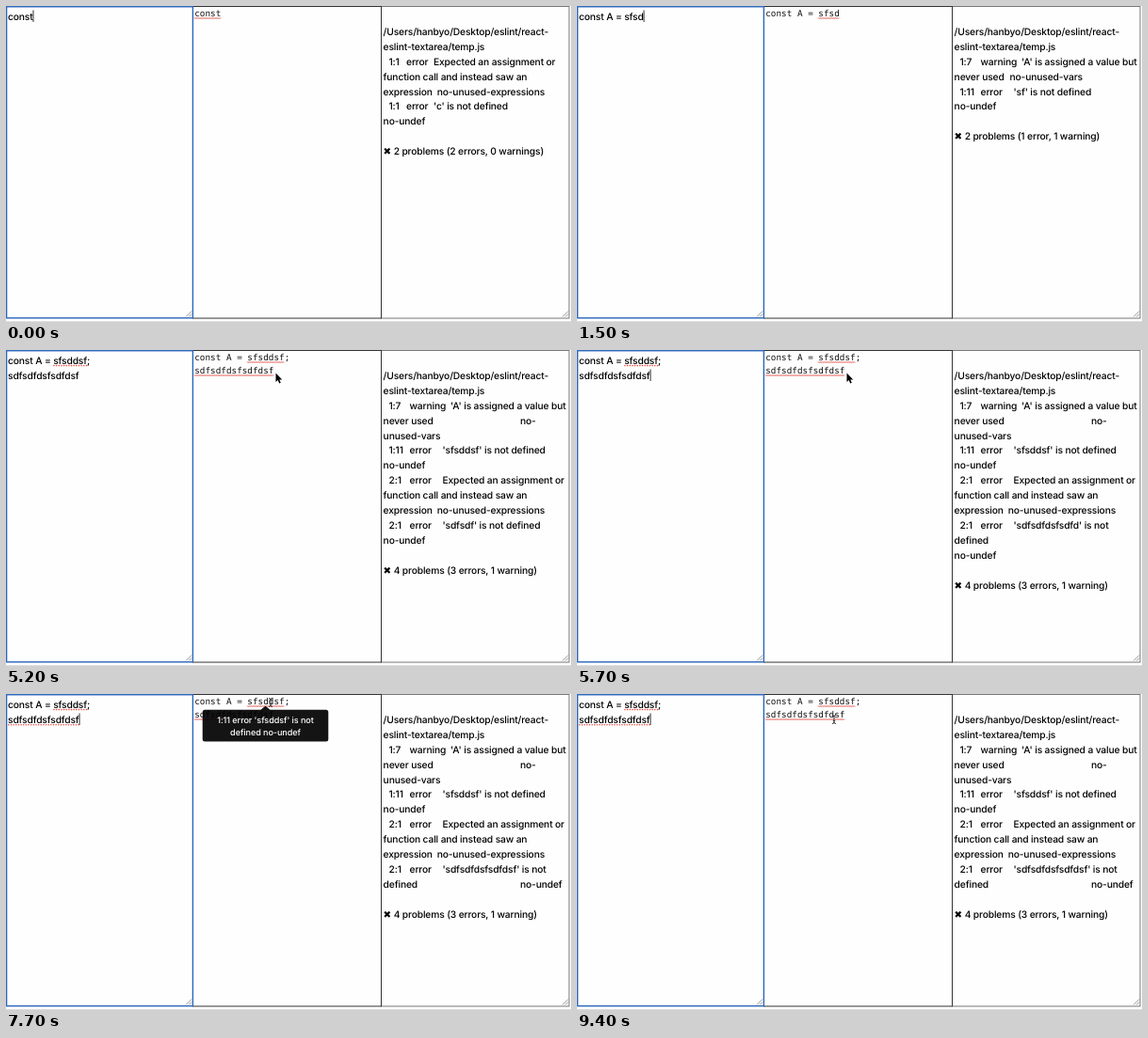
An HTML page with a canvas that plays this animation: 600x336 px, repeating every 9.6 s.

```html
<!DOCTYPE html>
<html lang="en">
<head>
<meta charset="utf-8">
<title>Lint textarea</title>
<style>
html, body { margin: 0; width: 100%; height: 100%; overflow: hidden; background: #fefefe; }
canvas { display: block; width: 600px; height: 336px; }
</style>
</head>
<body>
<canvas id="stage"></canvas>
<script>
const LOOP = 9600;
const SANS = '500 10.28px Inter, "Open Sans", sans-serif';
const TIP = '500 9.1px Inter, "Open Sans", sans-serif';
const MONO = '9.33px "DejaVu Sans Mono", monospace';
const TRACKING = -0.15;
const canvas = document.getElementById('stage');
const ctx = canvas.getContext('2d');
const ratio = window.devicePixelRatio || 1;
canvas.width = 600 * ratio;
canvas.height = 336 * ratio;

const LINE1 = 'const A = sfsddsf;';
const LINE2 = 'sdfsdfdsfsdfdsf';

// Each key: [time, characters on line 1, characters on line 2 or -1 before the break]
const keys = [
  [0, 5, -1], [100, 6, -1], [300, 7, -1], [400, 8, -1], [600, 9, -1], [700, 10, -1],
  [1200, 11, -1], [1300, 12, -1], [1400, 13, -1], [1500, 14, -1], [1600, 15, -1],
  [1700, 16, -1], [2200, 17, -1], [2700, 18, -1], [3000, 18, 0]
];
for (let i = 1; i <= 8; i++) keys.push([3500 + i * 100, 18, Math.round(i * 15 / 8)]);

const results = [
  [0, () => unused('c')],
  [200, () => parseError(['1:6', 'Parsing error: Unexpected'], ['token (1:5)'], 'const', 5)],
  [500, () => parseError(['1:8', "Parsing error: 'Const"],
    ["declarations' require an", 'initialization value (1:7)'], 'const A', 7)],
  [1000, () => parseError(['1:11', 'Parsing error: Unexpected'], ['token (1:10)'], 'const A =', 10)],
  [1400, () => undef('sf')],
  [1700, () => undef('sfsd')],
  [2200, () => undef('sfsdds')],
  [2500, () => undef('sfsddsf')],
  [4600, () => both('s')],
  [4800, () => both('sdf')],
  [5000, () => both('sdfsd')],
  [5200, () => both('sdfsdf')],
  [5400, () => both('sdfsdfdsf')],
  [5600, () => both('sdfsdfdsfsdfd')],
  [6300, () => both(LINE2)]
];

// Pointer path: [time, x, y, shape]
const pointer = [
  [4900, 300, 60, 'arrow'], [5000, 294, 42, 'arrow'], [5100, 288, 28, 'arrow'],
  [5200, 286.5, 24.5, 'arrow'], [5900, 286.5, 24.5, 'arrow'], [6000, 279, 38, 'arrow'],
  [6100, 270, 26, 'beam'], [6400, 270, 24, 'beam'], [6600, 280, 12, 'beam'],
  [6700, 280.5, 9, 'beam'], [7700, 281, 9, 'beam'], [8000, 312, 17, 'arrow'],
  [8500, 290, 12, 'beam'], [8700, 286, 50, 'arrow'], [8900, 282, 78, 'arrow'],
  [9200, 274, 36, 'arrow'], [9300, 273, 27, 'beam'], [9600, 273, 27, 'beam']
];

const last = (list, t) => list.reduce((hit, item) => item[0] <= t ? item : hit, list[0]);
const LEFT = 400.6;
const plain = text => [[LEFT, text]];
const head = () => [plain('/Users/hanbyo/Desktop/eslint/react-'), plain('eslint-textarea/temp.js')];
const row = (...parts) => parts;
const issue = (at, kind, msg, kx = 428.5, mx = 463.5) => row([406.5, at], [kx, kind], [mx, msg]);
const total = text => plain('✖ ' + text);

function unused(name) {
  return [...head(),
    issue('1:1', 'error', 'Expected an assignment or', 425, 454),
    plain('function call and instead saw an'),
    row([LEFT, 'expression'], [457.7, 'no-unused-expressions']),
    issue('1:1', 'error', `'${name}' is not defined`, 425, 454),
    plain('no-undef'), [], total('2 problems (2 errors, 0 warnings)')];
}

function parseError([at, msg], more, code, col) {
  const shift = at.length > 3 ? 4 : 0;
  return [...head(), issue(at, 'error', msg, 425 + shift, 454 + shift), ...more.map(plain), [],
    plain('> 1 | ' + code), plain('    | ' + ' '.repeat(col) + '^'), [],
    total('1 problem (1 error, 0 warnings)')];
}

function undef(name) {
  return [...head(),
    issue('1:7', 'warning', "'A' is assigned a value but", 428.5, 472),
    row([LEFT, 'never used'], [459.5, 'no-unused-vars']),
    issue('1:11', 'error', `'${name}' is not defined`),
    plain('no-undef'), [], total('2 problems (1 error, 1 warning)')];
}

function both(name) {
  let tail = [issue('2:1', 'error', `'${name}' is not defined`), plain('no-undef')];
  if (name.length > 10) {
    const end = issue('2:1', 'error', `'${name}' is not`);
    tail = name === LINE2
      ? [end, row([LEFT, 'defined'], [546, 'no-undef'])]
      : [end, plain('defined'), plain('no-undef')];
  }
  return [...head(),
    issue('1:7', 'warning', "'A' is assigned a value but", 428.5, 472),
    row([LEFT, 'never used'], [546, 'no-']), plain('unused-vars'),
    issue('1:11', 'error', "'sfsddsf' is not defined"), plain('no-undef'),
    issue('2:1', 'error', 'Expected an assignment or'),
    plain('function call and instead saw an'),
    row([LEFT, 'expression'], [457.7, 'no-unused-expressions']),
    ...tail, [], total('4 problems (3 errors, 1 warning)')];
}

function setFont(font, spacing) {
  ctx.font = font;
  ctx.letterSpacing = spacing + 'px';
}

function write(text, x, y, color = '#000') {
  ctx.fillStyle = color;
  ctx.fillText(text, x, y);
}

function box(x, y, w, h, color, width) {
  ctx.strokeStyle = color;
  ctx.lineWidth = width;
  ctx.strokeRect(x, y, w, h);
}

function grip(x, y) {
  ctx.strokeStyle = '#666';
  ctx.lineWidth = 0.7;
  ctx.beginPath();
  for (const d of [6, 3]) {
    ctx.moveTo(x - d, y);
    ctx.lineTo(x, y - d);
  }
  ctx.stroke();
}

function squiggle(x1, x2, y) {
  ctx.strokeStyle = '#e0392f';
  ctx.lineWidth = 0.9;
  ctx.beginPath();
  for (let x = x1, i = 0; x <= x2; x += 1, i++) ctx.lineTo(x, y + (i % 2 ? 0.5 : -0.5));
  ctx.stroke();
}

function dots(x1, x2, y) {
  ctx.fillStyle = '#f0483e';
  for (let x = x1; x < x2; x += 2.65) {
    ctx.beginPath();
    ctx.arc(x + 0.8, y, 0.8, 0, Math.PI * 2);
    ctx.fill();
  }
}

function drawEditor(t) {
  const [time, n1, n2] = last(keys, t);
  const first = LINE1.slice(0, n1);
  const second = n2 > 0 ? LINE2.slice(0, n2) : '';
  setFont(SANS, TRACKING);
  write(first, 2, 14.8);
  write(second, 2, 30.9);
  if (t >= 2700) {
    const start = 2 + ctx.measureText('const A = ').width;
    dots(start, start + ctx.measureText('sfsddsf').width, 16.6);
  }
  if (t >= 6000) dots(2, 2 + ctx.measureText(LINE2).width, 32.7);
  if ((t - time) % 1000 < 500) {
    const x = 2 + ctx.measureText(n2 < 0 ? first : second).width;
    ctx.fillStyle = '#000';
    ctx.fillRect(x, n2 < 0 ? 4.5 : 20.5, 0.8, 12.5);
  }

  setFont(MONO, 0);
  write(first, 200.2, 11.4, '#111');
  write(second, 200.2, 25.4, '#111');
  const cell = ctx.measureText('s').width;
  if (t < 200) squiggle(200, 200 + 5 * cell, 13);
  if (t >= 1400) squiggle(200 + 10 * cell, 200 + Math.min(n1, 17) * cell, 13);
  if (t >= 4600) squiggle(200, 200 + 15 * cell, 27);
}

function drawResult(t) {
  setFont(SANS, TRACKING);
  last(results, t)[1]().forEach((parts, i) => {
    for (const [x, text] of parts) write(text, x, 30.7 + i * 15.95);
  });
}

function tooltip(cx, top, lines) {
  const h = lines.length * 14 + 5.7;
  ctx.globalAlpha = 0.92;
  ctx.fillStyle = '#000';
  ctx.beginPath();
  ctx.roundRect(cx - 66.8, top, 133.6, h, 2.5);
  ctx.moveTo(cx - 5, top);
  ctx.lineTo(cx, top - 4);
  ctx.lineTo(cx + 5, top);
  ctx.fill();
  ctx.globalAlpha = 1;
  setFont(TIP, -0.08);
  ctx.textAlign = 'center';
  lines.forEach((line, i) => write(line, cx, top + 13.8 + i * 13.9, '#fff'));
  ctx.textAlign = 'left';
}

function drawTooltip(t) {
  if (t >= 6300 && t < 7100) {
    tooltip(242, 30.5, ['2:1 error Expected an', 'assignment or function call',
      'and instead saw an', 'expression no-unused-', 'expressions']);
  } else if (t >= 7100 && t < 8700) {
    tooltip(275.5, 16.7, ["1:11 error 'sfsddsf' is not", 'defined no-undef']);
  }
}

function drawPointer(t) {
  if (t < pointer[0][0]) return;
  const i = pointer.findIndex(p => p[0] > t) - 1;
  const [t0, x0, y0, shape] = pointer[i];
  const [t1, x1, y1] = pointer[i + 1];
  const k = (t - t0) / (t1 - t0);
  ctx.save();
  ctx.translate(x0 + (x1 - x0) * k, y0 + (y1 - y0) * k);
  ctx.beginPath();
  if (shape === 'arrow') {
    for (const [x, y] of [[0, 0], [0, 9.5], [2.2, 7.5], [3.7, 11], [5.3, 10.3], [3.8, 7], [6.8, 7]]) {
      ctx.lineTo(x, y);
    }
    ctx.closePath();
    ctx.lineJoin = 'round';
    ctx.strokeStyle = '#fff';
    ctx.lineWidth = 1.4;
    ctx.stroke();
    ctx.fillStyle = '#000';
    ctx.fill();
  } else {
    ctx.moveTo(-2, -4.5);
    ctx.quadraticCurveTo(0, -4.5, 0, -3);
    ctx.quadraticCurveTo(0, -4.5, 2, -4.5);
    ctx.moveTo(0, -3);
    ctx.lineTo(0, 3);
    ctx.moveTo(-2, 4.5);
    ctx.quadraticCurveTo(0, 4.5, 0, 3);
    ctx.quadraticCurveTo(0, 4.5, 2, 4.5);
    ctx.moveTo(-1.2, 1.7);
    ctx.lineTo(1.2, 1.7);
    ctx.strokeStyle = '#222';
    ctx.lineWidth = 0.9;
    ctx.stroke();
  }
  ctx.restore();
}

function draw(now) {
  const t = Math.floor((now % LOOP) / 100) * 100;
  ctx.setTransform(ratio, 0, 0, ratio, 0, 0);
  ctx.textRendering = 'geometricPrecision';
  ctx.fillStyle = '#fefefe';
  ctx.fillRect(0, 0, 600, 336);
  ctx.fillStyle = '#ddd';
  ctx.fillRect(0, 335, 600, 1);
  box(398.5, 0.5, 199.5, 331.5, '#777', 1);
  box(198.5, 0.5, 200, 331.5, '#333', 1);
  box(0.6, 0.75, 197.8, 331, '#2a66bc', 1.4);
  grip(197, 330.5);
  grip(597, 330.5);
  drawEditor(t);
  drawResult(t);
  drawTooltip(t);
  drawPointer(t);
}

const start = performance.now();
function tick() {
  draw(performance.now() - start);
  requestAnimationFrame(tick);
}
tick();
</script>
</body>
</html>
```
